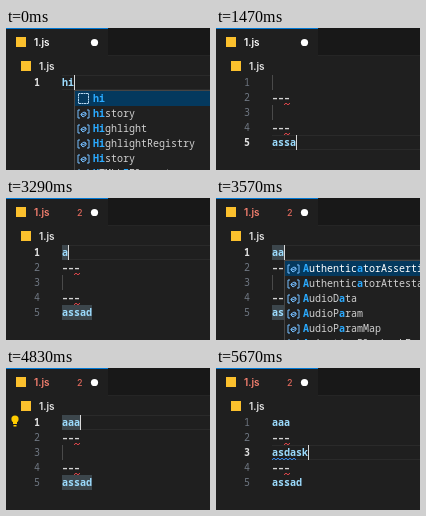
Write an HTML page with a canvas that moves like this. It is 204 px wide and 142 px high and loops after 5740 ms.

```html
<!DOCTYPE html>
<html lang="en">
<head>
<meta charset="utf-8">
<title>Editor typing</title>
<style>
  html, body { margin: 0; width: 100%; height: 100%; overflow: hidden; background: #1f1f1f; }
  canvas { display: block; width: 100vw; height: 100vh; }
</style>
</head>
<body>
<canvas></canvas>
<script>
const W = 204, H = 142, LOOP = 5740;
const CHAR = 6, ROW = 15, TEXT_X = 56, TOP = 47;
const MONO = '10px "Noto Sans Mono", "DejaVu Sans Mono", monospace';
const SANS = 'Inter, sans-serif';
const canvas = document.querySelector('canvas');
const ctx = canvas.getContext('2d');

// Each step: time, active line, new text of that line (or null), suggestion list
const steps = [
  [0, 0, 'hi', 'hi'], [70, 0, 'h', 'hi'], [140, 0, ''],
  [210, 1, ''], [280, 1, '-'], [350, 1, '--'], [420, 1, '---'],
  [490, 2, ''], [560, 3, '--'], [630, 3, '---'],
  [980, 4, ''], [1050, 4, 'a'], [1120, 4, 'a', 'a'], [1190, 4, 'as', 'as'],
  [1330, 4, 'ass', 'as'], [1470, 4, 'assa'], [1540, 4, 'assad'],
  [2240, 3, null], [2310, 2, null], [2380, 1, null], [2450, 0, null],
  [3290, 0, 'a'], [3360, 0, 'a', 'a'], [3500, 0, 'aa', 'aa'], [3640, 0, 'aaa', 'aa'],
  [4270, 0, null],
  [4900, 1, null], [4970, 2, null], [5110, 2, 'a'], [5180, 2, 'as'],
  [5460, 2, 'asd', 'asd'], [5530, 2, 'asda'], [5600, 2, 'asdas'], [5670, 2, 'asdask']
];

const suggestions = {
  hi: ['hi', 'history', 'Highlight', 'HighlightRegistry', 'History', 'HTMLLIElement'],
  a: ['async', 'Array', 'ArrayBuffer', 'Attr', 'Audio', 'Animation'],
  as: ['async', 'AbstractRange', 'Atomics', 'AbortSignal', 'Arguments', 'ClipboardItems'],
  aa: ['AuthenticatorAssertionResponse', 'AuthenticatorAttestationResponse',
       'AudioData', 'AudioParam', 'AudioParamMap', 'AnimationPlaybackEvent'],
  asd: ['assad']
};

const between = (t, a, b) => t >= a && t < b;

function rect(x, y, w, h, color) {
  ctx.fillStyle = color;
  ctx.fillRect(x, y, w, h);
}

function label(text, x, y, color, font) {
  ctx.fillStyle = color;
  ctx.font = font;
  ctx.fillText(text, x, y);
}

function disc(x, y, r, color) {
  ctx.fillStyle = color;
  ctx.beginPath();
  ctx.arc(x, y, r, 0, 7);
  ctx.fill();
}

function path(points, color, width = 1) {
  ctx.strokeStyle = color;
  ctx.lineWidth = width;
  ctx.beginPath();
  points.forEach(([x, y]) => ctx.lineTo(x, y));
  ctx.stroke();
}

function squiggle(x, y, length, color) {
  const points = [];
  for (let i = 0; i <= length; i += 2) points.push([x + i, y + (i % 4 ? -0.8 : 0.8)]);
  path(points, color);
}

function stateAt(t) {
  const state = { lines: [''], active: 0, popup: null };
  for (const [time, line, text, popup] of steps) {
    if (time > t) break;
    while (state.lines.length <= line) state.lines.push('');
    if (text !== null) state.lines[line] = text;
    state.active = line;
    state.popup = popup;
  }
  return state;
}

function drawHeader(t) {
  const failing = t >= 1680;
  rect(102, 0, 102, 28, '#181818');
  rect(102, 27, 102, 1, '#252525');
  rect(0, 0, 102, 1, '#0078d4');
  rect(10, 9, 10, 10, '#fbc02d');
  label('1.js', 28, 18, failing ? '#f88070' : '#ffffff', '600 10px ' + SANS);
  if (failing) label('2', 71, 18, '#e0685c', '500 9px ' + SANS);
  disc(88.5, 14.5, 3.6, '#ffffff');
  rect(15, 33, 10, 10, '#fbc02d');
  label('1.js', 33, 42, '#e4e4e4', '600 10px ' + SANS);
}

function drawLine(text, i, state, t) {
  const y = TOP + i * ROW, active = i === state.active;
  if (active) {
    rect(TEXT_X, y, W, 1, '#2a2a2a');
    rect(TEXT_X, y + ROW - 1, W, 1, '#2a2a2a');
  } else if (!text) {
    rect(TEXT_X, y, 1, ROW, '#4a4a4a');
  }
  const marked = i === 4 && between(t, 1750, 4900) || i === 0 && between(t, 3290, 4900);
  if (marked) rect(TEXT_X, y, text.length * CHAR, ROW, '#3c464c');
  label(i + 1, 28, y + 11, active ? '#e0e0e0' : '#6e7681', (active ? '600 ' : '500 ') + MONO);
  // The editor font draws its hyphens nearly as wide as a cell.
  label(text.replaceAll('-', '–'), TEXT_X, y + 11, text[0] === '-' ? '#d4d4d4' : '#9cdcfe', '600 ' + MONO);
  if (text === '---' && t >= 630) squiggle(68, y + 14, 6, '#e5484d');
  if (text === 'asdask') squiggle(TEXT_X, y + 14, 24, '#3794ff');
}

function drawIcon(x, y, first) {
  const blue = '#75beff';
  if (first) {
    ctx.strokeStyle = '#b8d8f0';
    ctx.lineWidth = 1;
    ctx.setLineDash([2, 0.5]);
    ctx.strokeRect(x + 0.5, y - 5.5, 10, 10);
    ctx.setLineDash([]);
    return;
  }
  path([[x + 2, y - 4], [x, y - 4], [x, y + 4], [x + 2, y + 4]], blue);
  path([[x + 9, y - 4], [x + 11, y - 4], [x + 11, y + 4], [x + 9, y + 4]], blue);
  path([[x + 3, y], [x + 6, y - 2], [x + 8, y - 1], [x + 8, y + 1], [x + 5, y + 3],
        [x + 3, y + 1], [x + 3, y], [x + 5, y + 1], [x + 8, y - 1]], blue);
}

// Letters matching the typed word, in order, are emphasised.
function drawMatch(item, word, x, y, color) {
  let found = 0;
  [...item].forEach((letter, i) => {
    const hit = found < word.length && letter.toLowerCase() === word[found];
    if (hit) found++;
    label(letter, x + i * CHAR, y, hit ? '#2aaaff' : color, (hit ? 'bold ' : '500 ') + MONO);
  });
}

function drawPopup(state) {
  const word = state.lines[state.active], items = suggestions[state.popup];
  const x = TEXT_X + word.length * CHAR, y = TOP + (state.active + 1) * ROW;
  const height = items.length * ROW + 2;
  rect(x, y, W, height, '#454545');
  rect(x + 1, y + 1, W, height - 2, '#202020');
  items.forEach((item, i) => {
    const top = y + 1 + i * ROW;
    if (!i) rect(x + 1, top, W, ROW, '#04395e');
    drawIcon(x + 4, top + 8, item === word);
    drawMatch(item, word, x + 19, top + 11, i ? '#d0d0d0' : '#ffffff');
  });
}

function drawBulb() {
  disc(9, 51, 3.6, '#ffcc00');
  rect(7, 54, 4, 2, '#ffcc00');
  rect(7.5, 57, 3, 1.5, '#ffcc00');
}

function draw(t) {
  const state = stateAt(t);
  rect(0, 0, W, H, '#1f1f1f');
  drawHeader(t);
  state.lines.forEach((text, i) => drawLine(text, i, state, t));
  const cursorHidden = between(t, 1750, 2240) || between(t, 3010, 3290);
  if (!cursorHidden) {
    const x = TEXT_X + state.lines[state.active].length * CHAR;
    rect(between(t, 2240, 3290) ? TEXT_X : x, TOP + state.active * ROW, 1, ROW, '#d8d8d8');
  }
  if (state.popup) drawPopup(state);
  if (between(t, 4550, 4900)) drawBulb();
}

function frame() {
  const ratio = devicePixelRatio || 1;
  const width = Math.round(innerWidth * ratio), height = Math.round(innerHeight * ratio);
  if (canvas.width !== width || canvas.height !== height) {
    canvas.width = width;
    canvas.height = height;
  }
  ctx.setTransform(width / W, 0, 0, height / H, 0, 0);
  draw((performance.now() - start) % LOOP);
  requestAnimationFrame(frame);
}

const start = performance.now();
frame();
</script>
</body>
</html>
```
